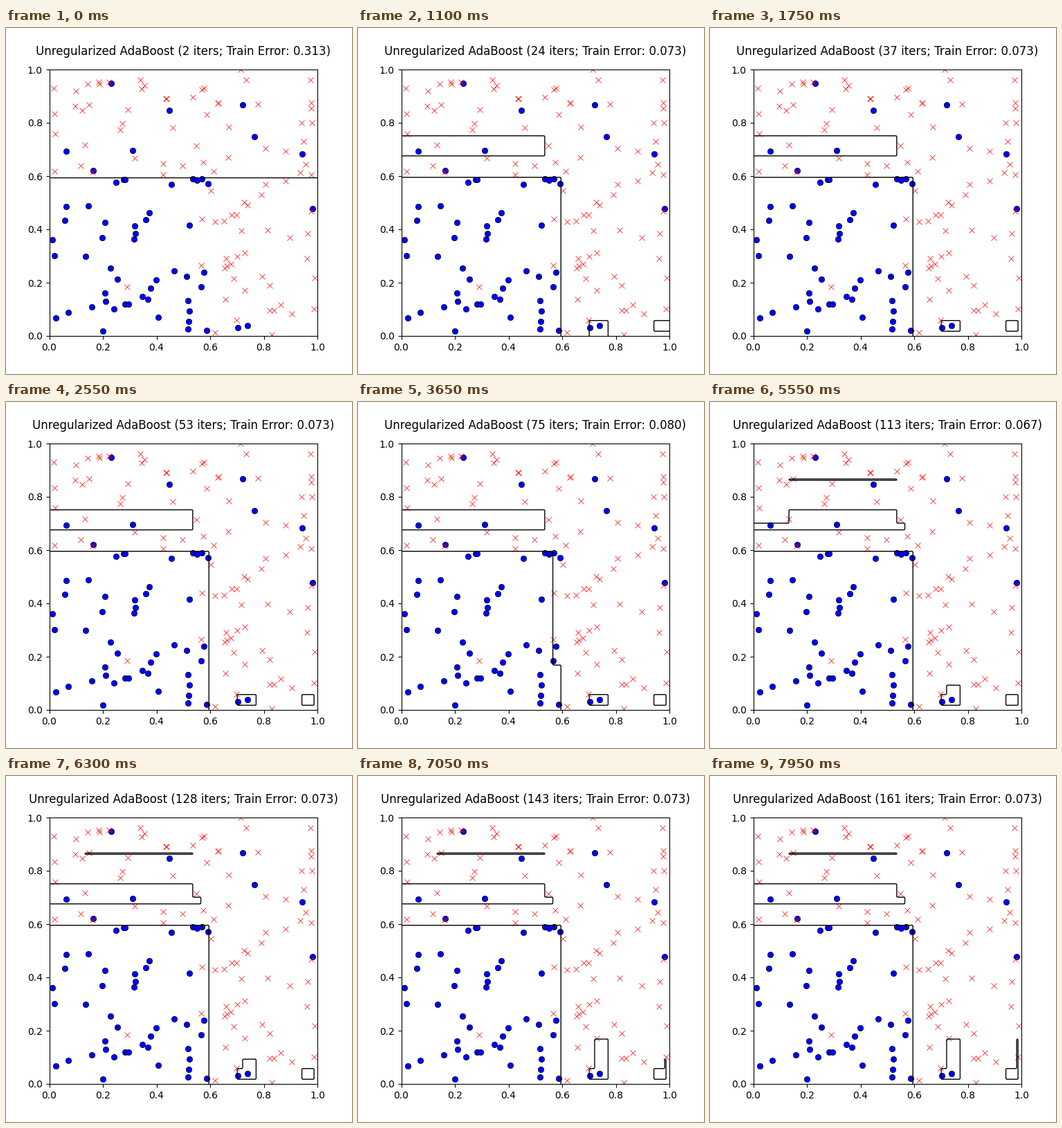
These frames come from a looping animation (500 px wide and 500 px high, 8000 ms). A matplotlib script:

```python
import numpy as np
import matplotlib.pyplot as plt
from matplotlib.animation import FuncAnimation

FRAMES = 160
FIRST = 2          # boosting rounds already done on the first frame
GRID = 200

# Uniform points: the lower-left square is positive, with a few noisy labels
rng = np.random.RandomState(0)
X = rng.rand(150, 2)
y = np.where((X < 0.6).all(axis=1), 1, -1)
NOISY = [(.944, .682), (.739, .039), (.064, .692), (.447, .846), (.722, .866),
         (.704, .032), (.165, .621), (.312, .696), (.765, .749), (.232, .949),
         (.982, .478), (.570, .439), (.567, .265), (.289, .183)]
for p in NOISY:
    y[np.argmin(((X - p) ** 2).sum(axis=1))] *= -1


def fit_stump(w):
    """Best weighted Gini split: feature, threshold, left sign, right sign."""
    best = None
    for f in range(2):
        order = np.argsort(X[:, f])
        v = X[order, f]
        pos = np.cumsum((w * (y > 0))[order])
        neg = np.cumsum((w * (y < 0))[order])
        lp, ln = pos[:-1], neg[:-1]
        rp, rn = pos[-1] - lp, neg[-1] - ln
        purity = (lp**2 + ln**2) / (lp + ln) + (rp**2 + rn**2) / (rp + rn)
        k = np.argmax(purity)
        if best is None or purity[k] > best[0]:
            left = 1 if lp[k] > ln[k] else -1
            right = 1 if rp[k] > rn[k] else -1
            best = purity[k], f, (v[k] + v[k + 1]) / 2, left, right
    return best[1:]


def boost(rounds):
    """Grid score and training error after every round."""
    w = np.full(len(y), 1 / len(y))
    axis = np.linspace(0, 1, GRID)
    mesh = np.meshgrid(axis, axis)
    total, field = np.zeros(len(y)), np.zeros((GRID, GRID))
    history = []
    for _ in range(rounds):
        f, t, left, right = fit_stump(w)
        pred = np.where(X[:, f] <= t, left, right)
        err = w[pred != y].sum()
        alpha = 0.5 * np.log((1 - err) / err)
        w = w * np.exp(-alpha * y * pred)
        w /= w.sum()
        total = total + alpha * pred
        field = field + alpha * np.where(mesh[f] <= t, left, right)
        history.append((np.where(field > 0, 1, -1),
                        np.mean(np.where(total > 0, 1, -1) != y)))
    return axis, history


axis, history = boost(FRAMES + FIRST)

fig, ax = plt.subplots(figsize=(5, 5), dpi=100)
ax.plot(*X[y > 0].T, "bo", markersize=6, markeredgecolor="k", markeredgewidth=0.5)
ax.plot(*X[y < 0].T, "rx", markersize=6, markeredgewidth=0.5)
ax.set_xlim(0, 1)
ax.set_ylim(0, 1)
title = ax.set_title("", pad=15)
lines = []


def draw(i):
    while lines:
        lines.pop().remove()
    n = i + FIRST
    region, error = history[n - 1]
    lines.append(ax.contour(axis, axis, region, levels=[0], colors="k",
                            linewidths=1))
    title.set_text(f"Unregularized AdaBoost ({n} iters; Train Error: {error:.3f})")
    return lines + [title]


anim = FuncAnimation(fig, draw, frames=FRAMES, interval=50, repeat=True,
                     repeat_delay=0, init_func=lambda: draw(0), blit=False)
plt.show()
```
